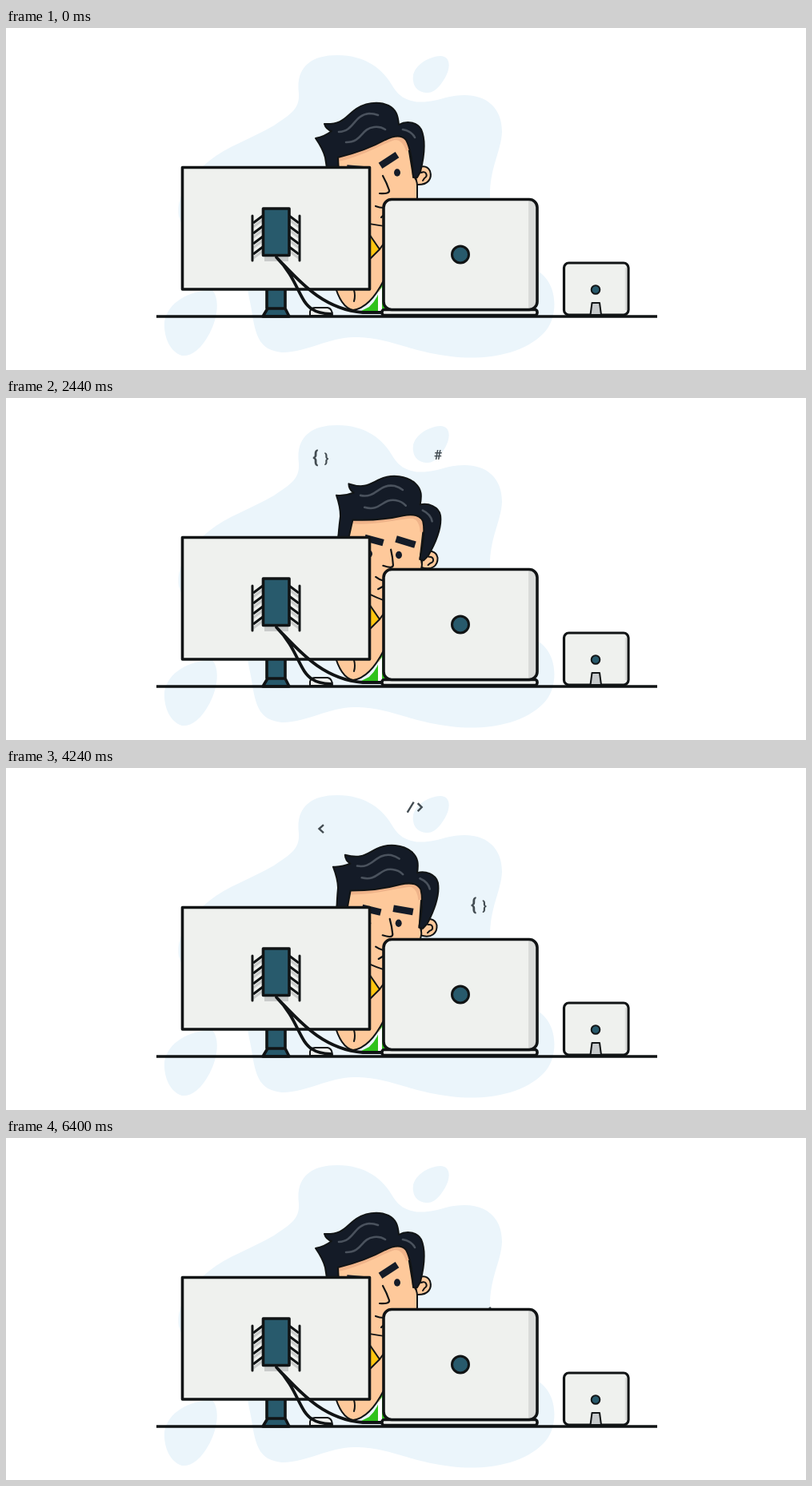
Recreate the animation shown at these times as an HTML page. Size 1000 px wide and 428 px high, loop 6.64 s.

```html
<!DOCTYPE html>
<html lang="en">
<head>
<meta charset="utf-8">
<title>Coder at work</title>
<style>
  html, body { margin: 0; width: 100%; height: 100%; overflow: hidden; background: #fff; }
  svg { display: block; width: 100%; height: 100%; }
  .line { fill: none; stroke: #111415; stroke-linecap: round; stroke-linejoin: round; stroke-width: 2.2; }
  .edge { stroke: #111415; stroke-width: 3.6; stroke-linejoin: round; }
  .thin { stroke-width: 2; }
  .case { fill: #eff1ee; }
  .teal { fill: #285a6c; }
  .skin { fill: #fec99b; }
  .blob { fill: #ebf5fb; }
  .ink { fill: #141b27; }
  .shine { fill: none; stroke: #4a525d; stroke-width: 2.6; stroke-linecap: round; }
  .sign { fill: #434c52; font: bold 17px Roboto, sans-serif; text-anchor: middle; }
  .sign path { fill: none; stroke: #434c52; stroke-width: 2.4; }
</style>
</head>
<body>
<svg viewBox="0 0 1000 428">
  <g class="blob">
    <path d="M366 82C362 50 380 34 414 34C450 34 472 52 484 74C500 100 530 93 550 87C590 77 620 92 620 130C619 155 604 175 605 214C608 270 640 295 664 304C690 318 692 362 672 382C645 410 595 416 556 411C500 404 480 387 435 387C400 388 380 405 345 406C318 403 313 388 308 360C306 345 304 340 302 327C290 280 225 275 216 235C213 215 225 190 245 174C270 150 300 142 335 122C358 107 367 100 366 82Z"/>
    <path d="M509 66C506 50 525 36 543 35C556 35 556 50 549 62C541 76 533 82 525 81C516 80 510 75 509 66Z"/>
    <path d="M198 368C202 342 232 328 258 328C268 340 264 365 254 383C244 402 232 411 220 410C204 405 197 385 198 368Z"/>
  </g>

  <g id="signs">
    <g class="sign"><text y="6">#</text></g>
    <g class="sign"><text x="-7" y="6" font-size="22" style="font-size:22px">{</text><text x="6.5" y="5">}</text></g>
    <g class="sign"><path d="M-9.5 6.5L-1.5-6.5M3.5-5L8.5 0L3.5 5"/></g>
    <g class="sign"><path d="M3-5L-2.500 0L3 5"/></g>
  </g>

  <!-- body -->
  <path class="skin" d="M450 235H476V330H450Z"/>
  <path fill="#ffc610" class="edge thin" d="M452 255L467 277L452 292Z"/>
  <path class="line thin" d="M467 277L474 267"/>
  <path fill="#2fc21c" d="M438 357L454 349Q466 338 470 318H478V357Z"/>
  <path fill="#fff" d="M465 332L470 324V357H465Z"/>
  <path class="skin" d="M408 310Q416 349 434 353Q454 351 474 312V290H408Z"/>
  <path class="line thin" d="M410 318Q418 350 434 353Q455 350 472 316M435 328Q437 335 435 342"/>

  <g id="head">
    <path class="skin edge thin" d="M512 179C516 172 526 171 530 179C533 188 528 197 513 196Z"/>
    <path class="line thin" d="M519 181C525 178 528 185 523 188M523 188L521 191"/>
    <path class="skin edge thin" d="M400 150L500 130L509 185Q514 190 514 197V212C513 235 500 249 484 249C470 248 440 244 425 236C406 215 402 190 400 150Z"/>
    <path fill="none" stroke="#f0b48a" stroke-width="6" d="M415 164C445 158 465 144 486 137Q498 137 503 153"/>
    <path class="ink edge thin" d="M387 138Q398 136 407 129Q400 127 398 120C420 121 424 112 434 104C447 93 466 91 478 97C488 102 490 110 491 121C500 116 514 117 519 127C526 143 522 164 518 180L514 187H509C508 165 506 151 500 140C494 133 484 135 474 140C456 150 436 157 415 162L417 198H406Q402 183 399 162Q396 151 387 138Z"/>
    <path class="shine" d="M416 130C436 129 434 109 454 107Q460 107 465 109M425 143C446 143 443 126 460 124Q468 123 474 127M496 127Q507 129 511 137"/>
    <path class="line" d="M471 185Q476 194 479 203Q480 208 467 207M462 223Q467 225 472 225M469 237L474 232"/>
  </g>
  <g class="ink">
    <g id="browRight"><path d="M-12.500-4.300H12.500V4.300H-12.500Z"/></g>
    <g id="browLeft"><path d="M-12-4.300H12V4.300H-12Z"/></g>
    <g id="eyeRight"><ellipse rx="4" ry="4.700"/></g>
    <g id="eyeLeft"><ellipse rx="4" ry="4.700"/></g>
  </g>

  <!-- monitor -->
  <path class="teal edge" d="M326 325H349V351H326ZM327 351H349L354 361H321Z"/>
  <path class="case edge" d="M220.500 174.500H454.500V327H220.500Z"/>
  <g id="bracket">
    <path fill="#c9cbca" d="M323 285H353V292H323Z"/>
    <g fill="none" stroke-width="3.200">
      <path id="slats" d="M309 244L321 235M309 257L321 248M309 270L321 261M309 283L321 274M366 244L354 235M366 257L354 248M366 270L354 261M366 283L354 274"/>
    </g>
    <path class="line" style="stroke-width:3" d="M308 235V291M367 235V291"/>
    <path class="teal edge" d="M321.500 226H354V284.500H321.500Z"/>
  </g>
  <path class="case edge thin" d="M380 360V355Q381 350 387 350H402Q408 351 408 360Z"/>
  <path class="line" style="stroke-width:3.800" d="M338 287C365 314 366 342 383 352Q390 357 406 358M338 287C363 312 393 352 446 356H474"/>

  <!-- laptop -->
  <rect class="case edge" x="470" y="352.500" width="194" height="7" rx="3"/>
  <rect class="case" x="472" y="214.500" width="192" height="138" rx="10"/>
  <path fill="#d9dbd9" d="M653 215Q663 215 663 224V343Q663 352 653 352Z"/>
  <rect class="edge" fill="none" x="472" y="214.500" width="192" height="138" rx="10"/>
  <circle class="teal edge" style="stroke-width:3" cx="568" cy="283.500" r="10.500"/>

  <!-- tablet -->
  <rect class="case edge" style="stroke-width:3.200" x="697.500" y="294" width="80.500" height="65" rx="6"/>
  <path stroke="#d9dbd9" stroke-width="2.500" d="M775 300V353"/>
  <circle class="teal edge thin" cx="737" cy="327.500" r="5.300"/>
  <path class="edge thin" fill="#c7cacb" d="M732.500 344H742L744 359H730.500Z"/>

  <path class="edge" d="M188 361H814"/>
</svg>
<script>
  const LOOP = 6640, STEP = 40;
  const $ = id => document.getElementById(id);
  const signs = [...$('signs').children];
  const starts = [840, 1840, 2840, 3640];

  // Time, x and y along the arc from the monitor over to the laptop.
  const arc = [
    [-300, 338, 204], [-160, 338.5, 178], [0, 343.5, 151], [300, 366, 110],
    [620, 396, 74], [800, 417, 57], [1000, 447, 44], [1250, 488, 38],
    [1600, 540, 71], [1800, 561, 100], [1960, 570, 122], [2360, 590, 168],
    [2760, 603, 217], [2980, 606, 245]
  ];

  const slats = $('slats');
  const slatShadow = slats.cloneNode();
  slatShadow.removeAttribute('id');
  slatShadow.setAttribute('transform', 'translate(0 5)');
  slatShadow.setAttribute('stroke', '#c9cbca');
  slats.setAttribute('stroke', '#111415');
  slats.before(slatShadow);

  const mix = (a, b, k) => a + (b - a) * k;
  const ease = k => (k = Math.min(1, Math.max(0, k)), k * k * (3 - 2 * k));

  function slope(i, axis) {
    const a = arc[Math.max(0, i - 1)], b = arc[Math.min(arc.length - 1, i + 1)];
    return (b[axis] - a[axis]) / (b[0] - a[0]);
  }

  function along(time, axis) {
    const i = arc.findIndex(p => p[0] > time) - 1;
    const a = arc[i], b = arc[i + 1], span = b[0] - a[0], k = (time - a[0]) / span;
    const left = k * (1 - k) ** 2 * span, right = k * k * (k - 1) * span;
    return mix(a[axis], b[axis], ease(k)) + left * slope(i, axis) + right * slope(i + 1, axis);
  }

  function place(node, x, y, turn = 0) {
    node.setAttribute('transform', `translate(${x} ${y}) rotate(${turn})`);
  }

  function pose(id, from, to, k) {
    place($(id), ...from.map((v, i) => mix(v, to[i], k)));
  }

  function draw(t) {
    const lift = ease((t - 1000) / 1000) - ease((t - 4000) / 1000);
    $('head').setAttribute('transform', `rotate(${15.7 * lift} 459 224)`);
    pose('browRight', [478.5, 165.5, -33], [499.5, 180, 17], lift);
    pose('browLeft', [438, 176.5, 5], [460, 178, 15], lift);
    pose('eyeRight', [489, 181], [491, 196.5], lift);
    pose('eyeLeft', [442, 190], [454, 195], lift);

    signs.forEach((sign, i) => {
      const time = t - starts[i];
      const shown = t >= starts[0] && time >= arc[0][0] && time < arc[arc.length - 1][0];
      sign.style.display = shown ? '' : 'none';
      if (shown) place(sign, along(time, 1), along(time, 2));
    });
  }

  const origin = performance.now();
  function tick() {
    const t = (performance.now() - origin) % LOOP;
    draw(Math.floor(t / STEP) * STEP);
    requestAnimationFrame(tick);
  }
  tick();
</script>
</body>
</html>
```
